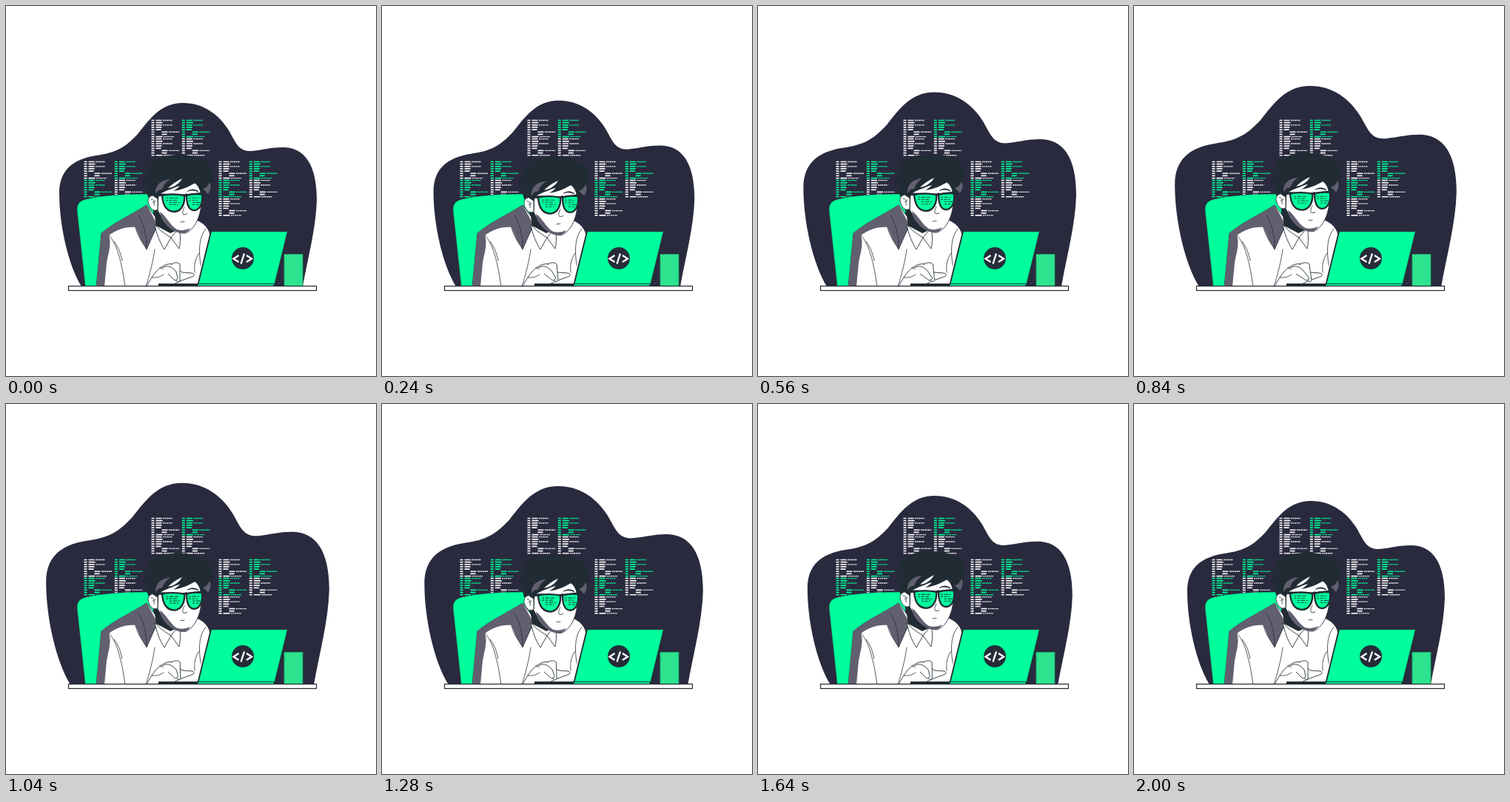
Recreate the animation shown at these times as an HTML page. Size 500 px wide and 500 px high, loop 2.04 s.

```html
<!DOCTYPE html>
<html lang="en">
<head>
<meta charset="utf-8">
<title>Programmer at work</title>
<style>
  html, body { margin: 0; width: 100%; height: 100%; overflow: hidden; background: #fff; }
  svg { display: block; width: 100%; height: 100%; }
  .line { fill: none; stroke: #263238; stroke-width: .8; stroke-linecap: round; stroke-linejoin: round; }
  .skin { fill: #fff; stroke: #263238; stroke-width: .9; stroke-linejoin: round; }
  .dark { fill: #212b33; }
  .shade { fill: #615f70; }
  .green { fill: #00ff9c; }
</style>
</head>
<body>
<svg viewBox="0 0 500 500">
  <path id="blob" fill="#2a2a3e" d="M102 379C84 350 72 296 72 253C72 222 90 207 122 202C150 198 161 191 178 173C194 153 209 131 239 131C267 131 288 147 301 168C311 185 314 197 332 196C350 194 358 191 374 191C404 191 420 215 420 262C419 300 408 340 401 379Z"/>
  <g id="code" stroke-width="1.7"></g>

  <path class="green" stroke="#263238" stroke-width=".6" d="M107 379L96 276Q95 264 108 261C134 255 162 254 198 254L205 379Z"/>

  <g id="body">
    <path class="skin" d="M122 379L129 307C147 292 168 283 190 269L204 288L248 286C262 289 274 297 276 310L260 379Z"/>
    <path class="shade" d="M122.500 379L129 307C147 292 168 283 190 269L205 296L190 329L182 316L175 299C160 298 149 303 139 310C143 322 138 335 136 347L133 379Z"/>
    <path class="line" d="M175 299C177 310 185 320 190 329L204 297M179 283C187 296 190 310 190 328"/>
    <path class="line" d="M139 310C150 321 156 345 161 379M201 329C199 344 194 364 189 379M146 318Q154 328 157 344M270 301C261 313 260 327 263 350M261 334C255 342 254 352 255 360"/>
    <path class="dark" d="M199 270L203 297L222 307L238 300L220 277Z"/>
    <path class="skin" d="M201 295C203 307 208 320 214 329L223 313L234 328C236 319 236 309 234 299C230 305 226 309 223 313C215 308 208 304 201 295Z"/>
  </g>

  <g id="head">
    <path class="dark" d="M192 258C188 244 186 229 191 217C199 205 220 200 239 201C259 202 276 210 280 224C280 236 276 244 277 249L265 258L230 255L209 276Z"/>
    <path class="skin" d="M206 252C213 250 222 248 230 244L254 238C263 244 264 254 264 263C264 282 256 302 242 307C231 308 218 299 211 287L205 276Z"/>
    <path class="shade" d="M208 278C217 284 221 296 231 302Q240 305 249 300Q245 307 240 307C226 307 216 297 210 287Z"/>
    <path class="skin" d="M205 260C201 253 192 256 192 264C193 272 199 279 205 275Z"/>
    <path class="line" d="M196 261Q202 261 200 270M198 266L202 263"/>
    <path class="dark" d="M199 257C198 243 204 228 220 219C240 210 264 215 277 231C280 241 275 248 268 255C267 248 261 242 256 239C247 244 239 248 226 250C233 246 237 242 238 237C230 242 223 247 214 251Q207 253 205 261Z"/>
    <path class="shade" d="M202 250C203 240 211 235 222 234Q213 240 211 248Q206 247 202 254ZM266 247Q273 245 275 238Q279 246 273 254Z"/>
    <path fill="#fff" d="M219 246Q226 239 238 233Q234 241 224 245Z"/>
    <path class="dark" d="M245 250Q252 245 260 250L260 251.500Q252 248 245 251Z"/>
    <path class="line" d="M241 272Q237 279 240 282L245 281M236 292L241 291.500"/>
    <path class="dark" d="M201 254L211 253.500L241 254.500Q243 253 246 254L266 251.500L268 255L266 258L201 257Z"/>
    <path id="lensL" class="green" stroke="#212b33" stroke-width="2.300" d="M211 256Q225 253 241 256C242 266 238 277 228 278C218 278 212 271 211 256Z"/>
    <path id="lensR" class="green" stroke="#212b33" stroke-width="2.300" d="M244 256Q254 253 265 254.500C266 265 263 274 256 276C248 277 244 270 244 256Z"/>
    <g id="reflection" stroke="#17564a" stroke-width="1.100"></g>
  </g>

  <g id="hand">
    <path class="skin" d="M190 379C195 369 201 360 208 354Q216 348 224 348L238 360L252 361Q257 364 251 366L237 371L220 379Z"/>
    <path class="line" d="M197 367Q206 368 213 363M208 354L222 359"/>
    <path id="fingerA" class="skin"/>
    <path id="fingerB" class="skin"/>
  </g>

  <rect class="dark" x="206" y="375" width="56" height="5"/>
  <path class="green" stroke="#263238" stroke-width="1" d="M277 304.700H380.500L363 376H259.500Z"/>
  <path class="line" style="stroke-width:1.800" d="M277 304.700L259.500 376"/>
  <path class="green" stroke="#263238" stroke-width="1.200" d="M259 375.500H362V380H259Z"/>
  <circle cx="320" cy="341" r="15" fill="#252b38"/>
  <path fill="none" stroke="#fff" stroke-width="2.400" d="M314.500 337L307.500 341.500L314.500 346M322 334.500L317.500 348.500M325 337L332 341.500L325 346"/>
  <rect x="376" y="335.500" width="25" height="44" fill="#2de38e" stroke="#1aa765" stroke-width=".8"/>
  <rect x="84.500" y="378.500" width="335" height="6" fill="#fff" stroke="#222830" stroke-width="1.200"/>
</svg>
<script>
const LOOP = 2040, STEP = 40, CYCLE = 2000;
const byId = id => document.getElementById(id);
const set = (id, name, value) => byId(id).setAttribute(name, value);

// Each row: indent, bar width, dotted tail width.
const rows = [[6, 8, 13], [6, 9, 0], [6, 8, 13], [6, 8, 0],
              [6, 7, 0], [14, 8, 14], [14, 7, 0], [6, 9, 14]];

function codeBlock(x, y, color) {
  const path = (d, extra = '') => `<path d="${d}" fill="none" stroke="${color}" ${extra}/>`;
  let bars = '', dots = '';
  rows.forEach(([indent, width, tail], i) => {
    const rowY = y + i * 3.15;
    bars += `M${x} ${rowY}h4M${x + indent} ${rowY}h${width}`;
    if (tail) dots += `M${x + indent + width + 1.5} ${rowY}h${tail}`;
  });
  return path(bars) + path(dots, 'stroke-dasharray="1.8 .7" stroke-width="1.3"');
}

function codeGroup(x, y, colors) {
  return [...colors].map((c, i) => codeBlock(
    x + (i % 2) * 41.3, y + (i >> 1) * 25.2, c === 'g' ? '#00f596' : '#f4f4f6')).join('');
}

byId('code').innerHTML =
  codeGroup(196.5, 154.5, 'wgww') + codeGroup(105.5, 210.5, 'wggw') + codeGroup(287.5, 210.5, 'wggww');

byId('reflection').innerHTML = [216, 247].map((x, side) =>
  [0, 1, 2, 3].map(i => {
    const y = 259.5 + i * 3, indent = i > 1 ? 5 : 0;
    return `<path d="M${x + indent} ${y}h3m1.500 0h${i % 2 ? 4 : 6}m1.500 0h${side || indent ? 2 : 5}"/>`;
  }).join('')).join('');

function draw(time) {
  const t = Math.floor((time % LOOP) / STEP) * STEP;
  const phase = 2 * Math.PI * t / CYCLE;
  const scale = 1 + 0.05 * (1 - Math.cos(phase));
  set('blob', 'transform', `translate(251 375) scale(${scale}) translate(-251 -375)`);
  set('head', 'transform', `translate(0 ${2.7 * Math.sin(2 * phase)})`);

  const tap = (1 - Math.cos(6 * phase)) / 2;
  const tipA = 232 + 5 * tap, tipB = 226 + 4 * tap;
  set('fingerA', 'd', `M223 350C${226 + 2 * tap} 346 ${233 + 2 * tap} 346 ${235 + 2 * tap} 349L${tipA + 3} 371Q${tipA} 375 ${tipA - 2} 370L228 359`);
  set('fingerB', 'd', `M211 354C218 349 225 353 230 359L${tipA} 368Q${tipB + 3} 373 ${tipB} 369L219 362`);
}

function tick(now) {
  draw(now);
  requestAnimationFrame(tick);
}
draw(0);
requestAnimationFrame(tick);
</script>
</body>
</html>
```
